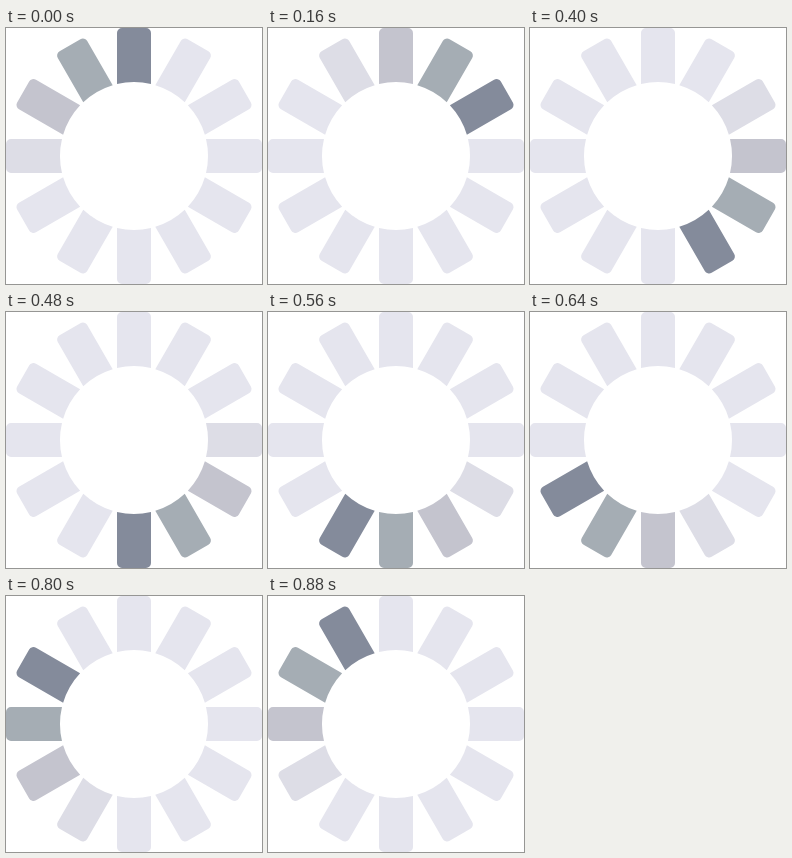
Write an HTML page that moves like this. It is 256 px wide and 256 px high and loops after 0.96 s.

```html
<!DOCTYPE html>
<html lang="en">
<head>
<meta charset="utf-8">
<title>Spinner</title>
<style>
  html, body { margin: 0; height: 100%; overflow: hidden; background: #fff; }
  svg { display: block; width: 100%; height: 100%; }
</style>
</head>
<body>
<svg viewBox="-128 -128 256 256"></svg>
<script>
  const COUNT = 12, STEP = 80;
  const TRAIL = ['#848b9b', '#a5adb4', '#c4c4ce', '#dddde6'];
  const IDLE = '#e5e5ee';
  // Rounded outer end, inner end cut by the central circle
  const SPOKE = 'M-17 -72.02V-123a5 5 0 0 1 5 -5H12a5 5 0 0 1 5 5V-72.02A74 74 0 0 0 -17 -72.02Z';

  const svg = document.querySelector('svg');
  const spokes = Array.from({ length: COUNT }, (_, i) => {
    const path = document.createElementNS(svg.namespaceURI, 'path');
    path.setAttribute('d', SPOKE);
    path.setAttribute('transform', `rotate(${i * 360 / COUNT})`);
    return svg.appendChild(path);
  });

  function draw() {
    const head = Math.floor(performance.now() / STEP) % COUNT;
    spokes.forEach((spoke, i) => {
      const age = (head - i + COUNT) % COUNT;
      spoke.setAttribute('fill', TRAIL[age] || IDLE);
    });
    requestAnimationFrame(draw);
  }
  draw();
</script>
</body>
</html>
```
